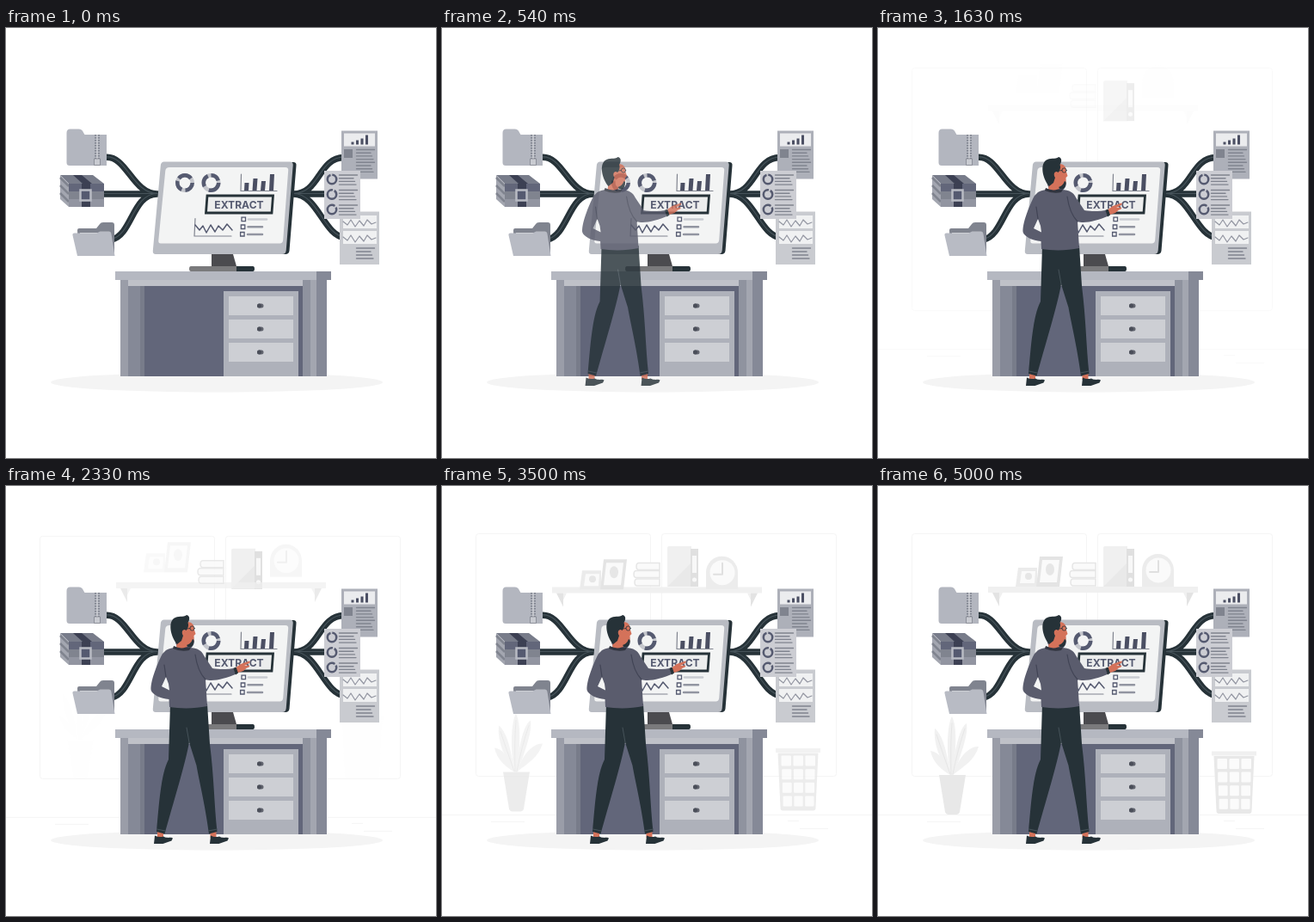
These frames come from a looping animation (500x500 px, 5180 ms). An HTML page:

```html
<!DOCTYPE html>
<html lang="en">
<head>
<meta charset="utf-8">
<title>Data extraction</title>
<style>
html, body { margin: 0; width: 100%; height: 100%; overflow: hidden; background: #fff; }
svg { display: block; width: 100vw; height: 100vh; }
.line { fill: none; stroke-linejoin: round; stroke-linecap: round; }
text { font: 700 12.1px Inter, "Open Sans", sans-serif; }
</style>
</head>
<body>
<svg viewBox="0 0 500 500">
  <g id="room">
    <g fill="none" stroke="#f5f5f5">
      <rect x="39.5" y="55.5" width="203" height="282" rx="3"/>
      <rect x="255.5" y="55.5" width="203" height="282" rx="3"/>
      <path d="M0 382.5H500M57 390.5H96M402 389.5H415M416 398.5H449"/>
    </g>
    <path d="M262 72q0-2 2-2h26v47h-28z" fill="#f0f0f0"/>
    <path d="M262 117L290 89V117z" fill="#e9e9e9"/>
    <path d="M289 73h9v44h-9z" fill="#e0e0e0"/>
    <path d="M291 81h5v20h-5z" fill="#f8f8f8"/>
    <circle cx="293.5" cy="109" r="2.5" fill="#f8f8f8"/>
  </g>
  <g id="shelf">
    <path d="M128 117H372V124H128z" fill="#f0f0f0"/>
    <path d="M133 124h8v16zM367 124h-8v16z" fill="#e3e3e3"/>
    <path d="M141 124h4l-4 8zM359 124h-4l4 8z" fill="#f0f0f0"/>
  </g>
  <g id="books" fill="#fafafa" stroke="#e6e6e6" stroke-width="1.5">
    <path d="M253 89.5H229q-3 0-3 4t3 4h24z"/>
    <path d="M253 98.5H226q-3 0-3 4t3 4h27z"/>
    <path d="M253 108H227q-3 0-3 4t3 4h26z"/>
  </g>
  <g id="clock">
    <path d="M307 117V98a18.5 19 0 0 1 37 0v19z" fill="#ececec"/>
    <circle cx="326" cy="98" r="14.5" fill="#fafafa"/>
    <path class="line" d="M326 87V100H316" stroke="#e0e0e0" stroke-width="2"/>
  </g>
  <g id="frames">
    <path d="M163 95h22v22h-25z" fill="#ebebeb"/>
    <path d="M167 99h16l-1 14h-17z" fill="#fafafa"/>
    <circle cx="175" cy="105" r="4" fill="#e6e6e6"/>
    <path d="M188 82h27l-4 35h-27z" fill="#e4e4e4"/>
    <path d="M191 86h20l-3 26h-20z" fill="#fafafa"/>
    <ellipse cx="200" cy="97" rx="5" ry="7" fill="#e6e6e6"/>
  </g>
  <g id="floor">
    <g fill="#f1f1f1">
      <path d="M84 336C78 300 82 274 86 268C92 280 91 305 87 336z"/>
      <path d="M86 336C90 300 96 280 103 276C105 290 97 310 88 336z"/>
      <path d="M84 336C80 306 74 288 66 282C64 298 72 320 84 336z"/>
      <path d="M87 336C94 314 107 302 117 303C113 318 100 326 87 336z"/>
      <path d="M84 336C78 318 70 309 61 308C64 322 74 330 84 336z"/>
    </g>
    <path class="line" d="M85 335Q84 300 86 276M87 335Q93 305 101 282M84 335Q75 310 68 289" stroke="#e6e6e6"/>
    <path d="M71 336h31l-7 43q-1 3-4 3h-9q-3 0-4-3z" fill="#e8e8e8"/>
    <path d="M388 308.500h52v5h-52z" fill="#f0f0f0"/>
    <path d="M390.500 314h47l-3 64q0 3-3 3h-35q-3 0-3-3z" fill="#e8e8e8"/>
    <g id="holes" fill="#fbfbfb"></g>
  </g>

  <ellipse cx="245" cy="412" rx="193" ry="11.500" fill="#f4f4f4"/>

  <g id="desk">
    <path d="M133 293H373V405H133z" fill="#9a9da8"/>
    <path d="M142 293H156V405H142zM361 293H373V405H361z" fill="#858997"/>
    <path d="M156 300H346V405H156z" fill="#62667a"/>
    <path d="M156 300h5v105h-5z" fill="#787c8a"/>
    <path d="M142 293H346V300H142z" fill="#bfc1c8"/>
    <path d="M253 306H340V405H253z" fill="#aeb1ba"/>
    <path d="M345 293h9v112h-9z" fill="#8f939f"/>
    <path d="M354 293h7v112h-7z" fill="#a3a6b0"/>
    <path d="M127 283H361V293H127z" fill="#b5b8c1"/>
    <path d="M361 283h17v10h-17z" fill="#858997"/>
    <g id="drawers"></g>
  </g>

  <g class="line">
    <path id="cables" d="M115 150.500C140 147 147 193 176 193M112 193H176M123 246C147 240 147 193 176 193
      M334 193H374M334 193C365 193 363 151 393 150.500M334 193C363 193 369 242 395 244" stroke="#263238" stroke-width="7.500"/>
    <path d="M115 150C140 146.500 147 192.500 176 192.500M112 192.500H176M123 245.500C147 239.500 147 192.500 176 192.500
      M334 192.500H374M334 192.500C365 192.500 363 150.500 393 150M334 192.500C363 192.500 369 241.500 395 243.500" stroke="#46535a" stroke-width="1.200"/>
  </g>

  <g id="archive">
    <path d="M70.500 122q0-4.500 4-4.500h10q4 0 5.500 4l1.500 2.500H117V160H74q-3.500 0-3.500-3.500z" fill="#b3b6bf"/>
    <path d="M106 124v28" stroke="#80848f" stroke-width="6" stroke-dasharray="1.500 1.500"/>
    <path d="M106 124v28" stroke="#d0d2d7" stroke-width="1.500"/>
    <path d="M102.500 152h7v7.500h-7z" fill="#c9cbd1" stroke="#80848f" stroke-width=".8"/>
  </g>

  <g id="parcel">
    <path d="M63 171H101L114 181H73z" fill="#787c8a"/>
    <path d="M78 171h10l12 10H89z" fill="#3c4053"/>
    <path d="M63 171l10 10v27l-10-9z" fill="#a3a6b0"/>
    <path d="M63 174l10 10M63 183l10 10M63 192l10 10" stroke="#80848f" stroke-width="2.500"/>
    <path d="M73 181h41v27H73z" fill="#9295a1"/>
    <path d="M73 181h41v9H73z" fill="#62667a"/>
    <path d="M73 190h41v9H73z" fill="#80848f"/>
    <path d="M88 181h10v27H88z" fill="#3c4053"/>
    <path d="M86.500 188.500h12v12h-12z" fill="#555a70" stroke="#b8bbc3" stroke-width="2.500"/>
  </g>

  <g id="folder">
    <path d="M83 235q0-2 2-2h20l4-5q1-2 4-2h10q3 0 3 3v35H84z" fill="#80848f"/>
    <path d="M86 238h36v20H86z" fill="#e6e7ea"/>
    <path d="M77.500 241q-.5-2.500 2-2.500h26l4-2h10q2.500 0 3 3l4 25.500H83z" fill="#b8bbc4"/>
  </g>

  <g id="papers"></g>

  <g id="monitor">
    <path d="M186 156H334q4 0 3.500 4l-8 99q-.5 4-4.500 4H180z" fill="#263238"/>
    <path d="M184 155.500H330q4 0 3.700 4l-8 99q-.4 4.500-4.500 4.500H174q-3.500 0-3.200-4l9-99q.3-4.500 4.200-4.500z" fill="#b9bcc3"/>
    <path d="M190 162H325q3.500 0 3.200 3.500l-6 81q-.3 4-4 4H180q-3 0-2.700-3.500l8-81q.5-4 4.700-4z" fill="#f3f4f4"/>
    <path d="M239 263h25l4 14h-29z" fill="#4b4b4f"/>
    <path d="M215 277h54v6h-54q-2 0-2-3t2-3z" fill="#7a7a7c"/>
    <path d="M268 277h19q2 0 2 3t-2 3h-19z" fill="#263238"/>
    <g id="rings"></g>
    <path class="line" d="M273.500 170L273 189.500H315M220 221.500L219 242H262" stroke="#80848f" stroke-width="1.200"/>
    <path d="M277.500 180h5l-.5 9h-5zM287.500 175h5l-1 14h-5zM297 178h5l-1 11h-5zM307 170h5l-1 19h-5z" fill="#4b4f63"/>
    <path class="line" d="M220 229l5 6 4-5 4 8 5-9 5 8 4-7 5 5 5-7 6 7" stroke="#555a70" stroke-width="1.500"/>
    <path d="M274 220.200h4.500v4.500H274zM273.300 229h4.500v4.500h-4.500zM272.600 237.500h4.500v4.500h-4.500z" fill="none" stroke="#555a70" stroke-width="1.300"/>
    <path class="line" d="M282 222.500H303" stroke="#c9cbd1" stroke-width="2.500"/>
    <path class="line" d="M281.500 231.300H298M281 240H298" stroke="#9295a1" stroke-width="2.500"/>
    <path d="M234 195H310.500L309 215H232.500z" fill="#eceded" stroke="#263238" stroke-width="2.800"/>
    <text x="242.300" y="209.500" fill="#555a70">EXTRACT</text>
  </g>

  <g id="man">
    <path d="M176 400h7v9h-7zM237.500 400h7v9h-7z" fill="#d4725a"/>
    <path id="shoe" d="M173 406.500q5 2.500 10 1c4 2.500 8 .5 11 2l-1.500 3-10 3.500H172z" fill="#263238"/>
    <use href="#shoe" x="65"/>
    <path d="M191 253H234L237 300C242 340 242 370 245.500 402L236 404.500C231.500 370 224 340 221.500 325L213 298C208 325 194 370 184.500 404.500L175 402C178 370 180 335 189 318z" fill="#263238"/>
    <path class="line" d="M175.500 399l9.500 2M235.500 401l10-2M213 298l-3-17" stroke="#46535a"/>
    <path d="M266 212l7-5 10-3.500q2 1-1 3l-5 2.500 6-.5q1 2-3 3l-4 3.500-9 3z" fill="#d4725a"/>
    <path fill-rule="evenodd" d="M186 191C192 187 200 188 213 188C223 188 228 192 230 197L240 212C250 214 260 213 266 211.500L268 218.500C255 224 240 228 232 225L234 256C220 259 203 259 190 257L189.500 248C180 247 170 243 168.500 237C168 225 178 202 182 195z
      M186 222L181 233L190 237.500L189 230z" fill="#5a5c6d"/>
    <path class="line" d="M184 208L186 222M220 196C222 210 227 220 232 225" stroke="#414455" stroke-width="1.200"/>
    <path d="M264.500 212l3-1.500 2.500 7-3 2z" fill="#263238"/>
    <path d="M199 178L205 165L212 158C217 159 219 162 218.500 166L220.500 172L218.500 174C219 181 218 187 211 186L208 190L198 189z" fill="#d4725a"/>
    <path d="M195 186q8 4 14 1.500l6 .5-2 3q-10 2-19-2z" fill="#30343f"/>
    <path d="M199 184C192 176 188 160 195 154C200 150.500 206 153 210 150C214.500 151 213.500 156 211.500 159C213 163 211 166 209.500 168C206 165 203 170 206 174L204 180z" fill="#263238"/>
    <path d="M210 185q5-1.500 7-7l1.500 1q0 7-4 8.500-3 .5-4.500-2.500z" fill="#263238"/>
    <circle cx="216.500" cy="165.500" r="2.600" class="line" stroke="#263238" stroke-width=".8"/>
    <path class="line" d="M207 166.500l7-1" stroke="#263238" stroke-width=".8"/>
  </g>
</svg>
<script>
const $ = id => document.getElementById(id);

const box = (x, y, w, h, fill) => `<rect x="${x}" y="${y}" width="${w}" height="${h}" fill="${fill}"/>`;
const line = (d, color, width = 1.5) => `<path class="line" d="${d}" stroke="${color}" stroke-width="${width}"/>`;
const range = n => [...Array(n).keys()];

function ring(x, y, r, width, dashes) {
  const base = `<circle cx="${x}" cy="${y}" r="${r}" fill="none" stroke-width="${width}"`;
  return `${base} stroke="#c4c6cc"/>${base} stroke="#555a70" pathLength="100" stroke-dasharray="${dashes}"/>`;
}

// Rows of text with uneven right edges
const rows = (x, y, width, count, step) =>
  line(range(count).map(i => `M${x} ${y + i * step}h${width - (i * 3 % 4) * 1.5}`).join(""), "#80848f", 1.4);

const wave = (x, y) => line(`M${x} ${y}l5 4 4-6 5 8 5-7 5 6 4-7 5 5 5-2`, "#9295a1", 1.2);

$("drawers").innerHTML = [312, 339, 366].map(y =>
  box(259, y, 75, 22, "#cdcfd4") +
  `<rect x="292" y="${y + 8.5}" width="7.500" height="5" rx="2.500" fill="#62656f"/>` +
  `<circle cx="294.500" cy="${y + 11}" r="2.500" fill="#4b4f5a"/>`).join("");

$("holes").innerHTML = range(4).map(row => range(3).map(col => {
  const inset = row * .7;
  return `<rect x="${394.5 + inset + col * (14 - row * .4)}" y="${317 + row * 15.6}" width="${11.5 - row * .4}" height="12" rx="1"/>`;
}).join("")).join("");

$("rings").innerHTML = ring(208, 180, 8.7, 4.5, "24 8 22 6 30 10") + ring(238.5, 180, 8.7, 4.5, "30 12 26 7 20 5");

$("papers").innerHTML =
  box(390, 119.5, 42, 56, "#adb0b9") + box(393, 122.5, 36, 15, "#ebecee") +
  [3, 5, 7, 11].map((h, i) => box(401.5 + i * 5.5, 135.5 - h, 3, h, "#4b4f63")).join("") +
  box(393, 141, 10, 10, "#80848f") + rows(407.5, 141.5, 21, 8, 3.7) +
  box(388, 213.5, 46, 61.5, "#c9cbd0") +
  box(392, 218, 39, 15, "#f0f1f2") + box(392, 236, 39, 15, "#f0f1f2") +
  wave(392, 225) + wave(392, 243) + rows(407.5, 256, 21, 4, 4) +
  box(370, 166, 42, 56, "#cccdd3") +
  [176, 193.5, 211].map((y, i) => ring(379, y, 5.2, 2.5, `${70 + i * 8} 6 40`) + rows(387.5, y - 5, 21, 4, 3.7)).join("");

// cubic-bezier(.36, -.01, .5, 1.38)
function ease(x) {
  if (x <= 0) return 0;
  if (x >= 1) return 1;
  const curve = (s, a, b) => 3 * (1 - s) ** 2 * s * a + 3 * (1 - s) * s * s * b + s ** 3;
  let low = 0, high = 1;
  for (let i = 0; i < 24; i++) {
    const mid = (low + high) / 2;
    if (curve(mid, .36, .5) < x) low = mid; else high = mid;
  }
  return curve(low, -.01, 1.38);
}

const LOOP = 5180;
const delays = { room: 0, books: 450, shelf: 550, clock: 780, frames: 950, floor: 1650 };

function place(id, x, y, opacity) {
  $(id).setAttribute("transform", `translate(${x} ${y})`);
  $(id).setAttribute("opacity", Math.max(0, Math.min(1, opacity)));
}

function draw() {
  const t = performance.now() % LOOP;
  const walk = ease(t / 1000);
  place("man", -30 * (1 - walk), 0, walk);
  for (const id in delays) {
    const drop = ease((t - delays[id]) / 3000);
    place(id, 0, -50 * (1 - drop), drop ** 3);
  }
  requestAnimationFrame(draw);
}
draw();
</script>
</body>
</html>
```
